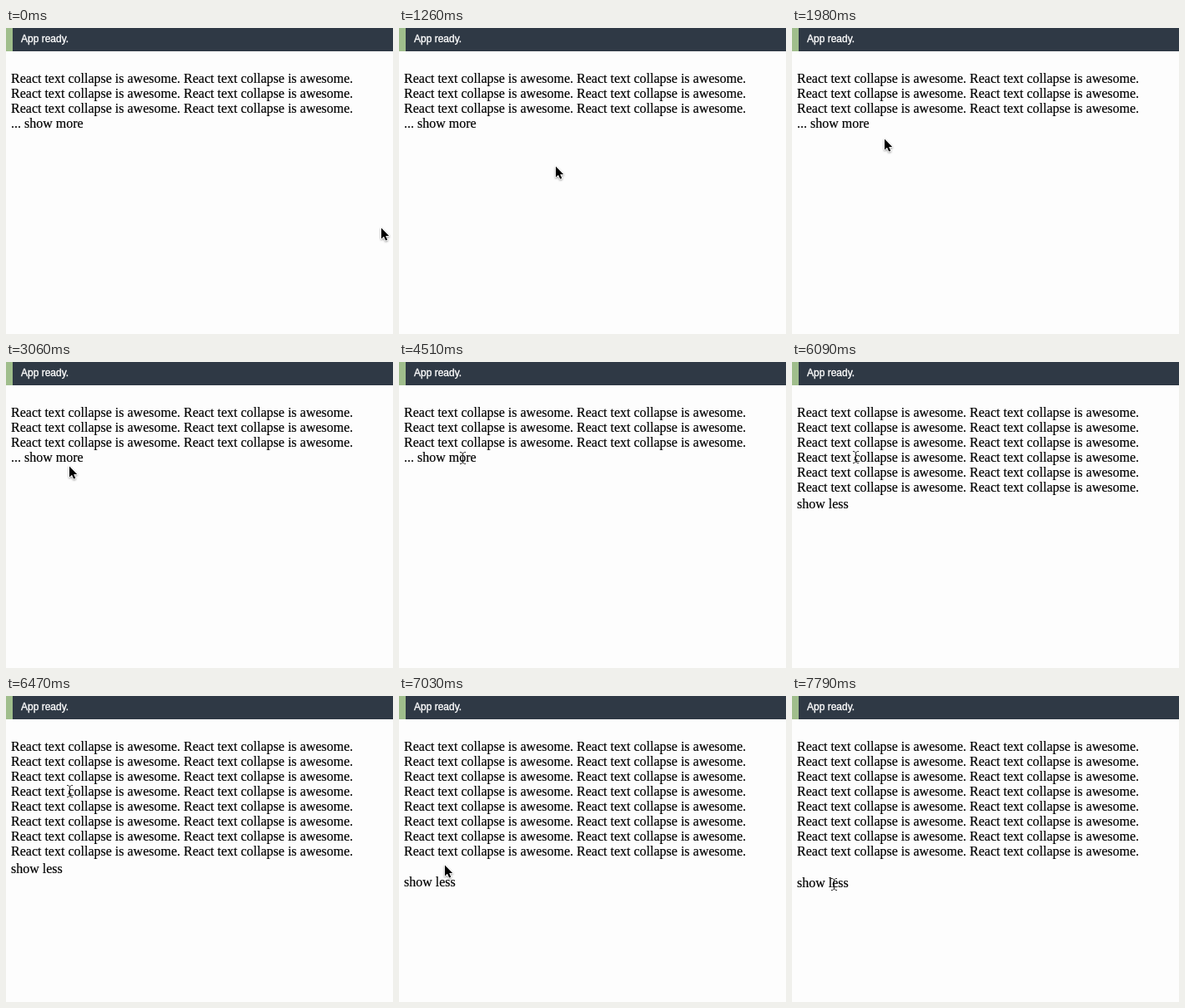
Animation, 464 px wide and 368 px high, one loop 8000 ms. Source, as an HTML page:

```html
<!DOCTYPE html>
<html lang="en">
<head>
<meta charset="utf-8">
<title>Text collapse</title>
<style>
  html, body { margin: 0; width: 100%; height: 100%; overflow: hidden; background: #fdfdfd; }
  svg { display: block; font: 16px "Liberation Serif", Times, serif; }
  text { stroke: #000; stroke-width: .2; }
  .status { font: 12px "Liberation Sans", Arial, sans-serif; fill: #fff; stroke: #fff; stroke-width: .35; }
  .halo {
    stroke: #fff; stroke-width: 1.6; stroke-linejoin: round; paint-order: stroke;
    filter: drop-shadow(0 1px 1px rgba(0, 0, 0, .4));
  }
  .beam { fill: none; stroke: #222; stroke-width: 1; }
</style>
</head>
<body>
<svg width="464" height="368" viewBox="0 0 464 368">
  <clipPath id="fold"><rect id="foldBox" y="52" width="464" height="54"/></clipPath>
  <rect width="464" height="28" fill="#2f3945"/>
  <rect width="8" height="28" fill="#a0be8c"/>
  <text class="status" x="18" y="17">App ready.</text>
  <g id="lines" clip-path="url(#fold)"></g>
  <text id="label" x="6"></text>
  <path id="arrow" class="halo" d="M0 .5V13.5L3 10.7L5.2 15.6L7.3 14.7L5.2 9.9H9.2Z"/>
  <path id="beam" class="beam" d="M-3 -6.5H-1.5L.5 -5L2.5 -6.5H4M.5 -5V6M-3 7.5H-1.5L.5 6L2.5 7.5H4M-1.5 3.5H2.5"/>
</svg>
<script>
const LOOP = 8000, TOP = 52, LINE = 18, ROWS = 8, RIGHT = 418;
const CLOSED = 54, OPEN = 164, EXPAND_AT = 5640, EXPAND_MS = 1500;
const el = id => document.getElementById(id);

// Pointer stops: start time, end time, x, y reached
const moves = [
  [0, 0, 450, 240], [20, 20, 450, 238], [700, 1260, 188, 166],
  [1800, 1980, 111, 133], [2520, 3060, 76, 125],
  [4130, 4510, 76, 115], [4650, 4650, 76, 114], [6490, 7250, 50, 226]
];

const sentence = "React text collapse is awesome.";
for (let i = 0; i < ROWS; i++) {
  const row = document.createElementNS("http://www.w3.org/2000/svg", "text");
  row.setAttribute("x", 6);
  row.setAttribute("y", 66 + i * LINE);
  row.textContent = sentence + " " + sentence;
  el("lines").append(row);
}

const clamp = v => Math.min(1, Math.max(0, v));
const smooth = p => p * p * (3 - 2 * p);

// CSS "ease": cubic-bezier(.25, .1, .25, 1)
function ease(x) {
  if (x >= 1) return 1;
  const bezier = (a, b, s) => 3 * a * s * (1 - s) ** 2 + 3 * b * s * s * (1 - s) + s ** 3;
  let lo = 0, hi = 1;
  for (let i = 0; i < 20; i++) {
    const mid = (lo + hi) / 2;
    if (bezier(.25, .25, mid) < x) lo = mid; else hi = mid;
  }
  return bezier(.1, 1, hi);
}

function pointerAt(t) {
  let [, , x, y] = moves[0];
  for (const [from, to, nx, ny] of moves) {
    if (t < from) break;
    const p = to > from ? smooth(clamp((t - from) / (to - from))) : 1;
    x += (nx - x) * p;
    y += (ny - y) * p;
  }
  return [Math.round(x), Math.round(y)];
}

function draw(t) {
  const expanding = t >= 5670;
  const grown = expanding ? ease(clamp((t - EXPAND_AT) / EXPAND_MS)) : 0;
  const height = Math.floor(CLOSED + (OPEN - CLOSED) * grown);
  const bottom = TOP + height;
  el("foldBox").setAttribute("height", height);
  el("label").setAttribute("y", bottom + 14);
  el("label").textContent = expanding ? "show less" : "... show more";

  const [x, y] = pointerAt(t);
  const onText = y < Math.min(bottom, TOP + ROWS * LINE);
  const onLabel = y >= bottom && y < bottom + LINE;
  const overText = x < RIGHT && (onText || onLabel);
  for (const id of ["arrow", "beam"]) {
    el(id).setAttribute("transform", `translate(${x} ${y})`);
    el(id).setAttribute("visibility", (id === "beam") === overText ? "visible" : "hidden");
  }
}

const start = performance.now();
function tick() {
  draw((performance.now() - start) % LOOP);
  requestAnimationFrame(tick);
}
tick();
</script>
</body>
</html>
```
